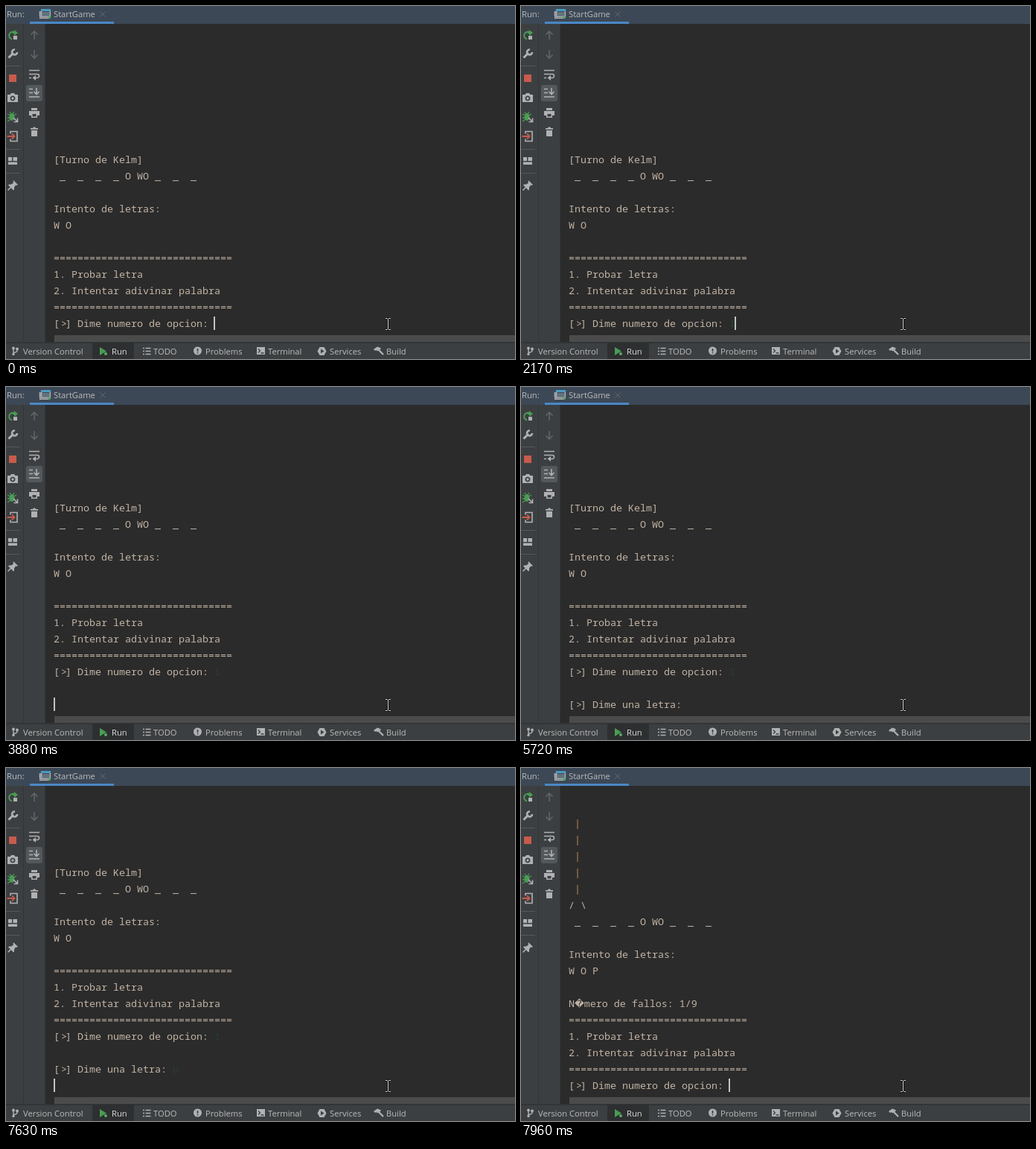
These frames come from a looping animation (684x474 px, 8000 ms). An HTML page:

```html
<!DOCTYPE html>
<html lang="es">
<head>
<meta charset="utf-8">
<title>Run console</title>
<style>
  html, body { margin: 0; width: 100%; height: 100%; overflow: hidden; background: #2b2b2b; }
  #console { position: absolute; left: 53px; top: 24px; width: 631px; height: 427px; overflow: hidden; }
  #log {
    position: absolute; left: 11px; bottom: 14px; margin: 0; color: #c2b3a4;
    font: 13.333px/22px "Noto Sans Mono", "DejaVu Sans Mono", monospace;
    font-variant-ligatures: none;
  }
  #log i { font-style: normal; position: relative; left: 2px; }
  #log b { font-weight: normal; color: #ba8c60; }
  #log u { text-decoration: none; font: 12.5px/0 "DejaVu Sans", sans-serif; }
  #log em { font-style: normal; color: #25402d; }
  #log em.fresh { color: #1f512c; }
  #caret { position: absolute; bottom: 16px; width: 2px; height: 18px; background: #c4c4c4; }
  svg { position: absolute; left: 0; top: 0; display: block; }
  text { font: 11.2px "Open Sans", "Noto Sans", sans-serif; fill: #bbb; }
  .line { fill: none; stroke: #afb1b3; stroke-width: 1.6; }
  .dim { stroke: #626568; }
  .fill { fill: #afb1b3; }
  .green { stroke: #499c54; }
  .red { stroke: #c75b4c; }
</style>
</head>
<body>
<div id="console"><pre id="log"></pre><div id="caret"></div></div>

<svg width="684" height="474" viewBox="0 0 684 474">
  <!-- panels -->
  <path fill="#3c3f41" d="M0 24H52V451H0ZM0 453H684V474H0Z"/>
  <path fill="#323537" d="M23 24h1V451h-1ZM52 24h1V451h-1ZM0 451H684v2H0Z"/>
  <path fill="#3d4856" d="M0 0H684V24H0Z"/>
  <path fill="#4a88c7" d="M32 21H145V24H32Z"/>
  <path fill="#2d2f30" d="M116 452H172V474H116Z"/>
  <path fill="#a6a6a6" fill-opacity=".26" d="M65 442H684V451H65Z"/>
  <path fill="#55585a" d="M0 80H19v1H0ZM0 192H19v1H0ZM0 224H19v1H0Z"/>

  <!-- header -->
  <text x="1" y="15">Run:</text>
  <text x="64" y="15">StartGame</text>
  <path class="line" stroke-width="1" d="M45.5 13V7M47.7 4.7H59.3V14.3H47.7Z"/>
  <path fill="#4a9bc2" d="M47 4H60V7H47Z"/>
  <path fill="#62737f" d="M49 8H58V13H49Z"/>
  <path class="fill" d="M45 7h1.5v8.5H57V17H45Z"/>
  <circle cx="58" cy="15" r="2" fill="#59a869"/>
  <path class="line dim" style="stroke-width:1" d="M126.500 7.500l7 7m0-7l-7 7"/>

  <!-- first toolbar -->
  <path class="line green" style="stroke-width:2" d="M13 36.500A5 5 0 1 0 8 44.500M9 36h5"/>
  <path fill="#499c54" d="M11 32l5 4-5 4Z"/>
  <path class="fill" d="M10 40h5v5h-5Z"/>
  <path class="line" style="stroke-width:3" d="M3.500 69.500L10 63"/>
  <path class="line" style="stroke-width:2.600" d="M12 58.500A3.500 3.500 0 1 0 15 62"/>
  <path fill="#c75b4c" d="M4 92H14V102H4Z"/>
  <path class="fill" fill-rule="evenodd" d="M2 119h3.500l1.500-2h4l1.500 2H16v10H2ZM9 120.500a3.500 3.500 0 1 0 .01 0ZM9 122.300a1.700 1.700 0 1 1-.01 0Z"/>
  <ellipse cx="8" cy="149" rx="3.500" ry="5" fill="#499c54"/>
  <path class="line green" style="stroke-width:1.300" d="M2 145l4 2m-4 3h4m-4 5l4-3M14 145l-4 2M5 142l2 3m4-3l-2 3"/>
  <path class="line" d="M10 150l5 5M15.500 150.500v5h-5"/>
  <path class="line" d="M6 171.500v-3h9v13H6v-3"/>
  <path class="line red" style="stroke-width:1.800" d="M1.500 175H11M8 171.500l3.500 3.500L8 178.500"/>
  <path class="fill" d="M3 203h5v5H3ZM9.500 203H15v5H9.500ZM3 209.500H15V213H3Z"/>
  <path class="fill" d="M10 234l6 6-2 1-1-.5-2 3v3l-1 1-7-7 1-1h3l3-2-.5-1Z"/>
  <path class="line" d="M7 243l-4.500 4.500"/>

  <!-- second toolbar -->
  <path class="line dim" d="M38 45V34M33.500 38.500L38 34l4.500 4.500M38 59V70M33.500 65.500L38 70l4.500-4.500"/>
  <rect x="27" y="106" width="22" height="22" rx="3" fill="#53585b"/>
  <path class="line" d="M31 86.500H45M31 91.500h11a2.500 2.500 0 0 1 0 5h-4M31 96.500h3"/>
  <path class="fill" d="M40 93v7l-4.500-3.500Z"/>
  <path class="line" d="M31 111.500h5M31 116.500h5M31 122H45M41 110v8M37.500 115l3.500 3.500 3.500-3.500"/>
  <path class="fill" fill-rule="evenodd" d="M34 137h8v3h-8ZM31 141H45v6h-3v3h-8v-3h-3ZM35.500 145v3.500h5V145Z"/>
  <path class="fill" d="M33 164h3l1-1.500h2l1 1.500h3v1.700H33ZM34 167h8v8h-8Z"/>

  <!-- tool window bar -->
  <path class="line" style="stroke-width:1.400" d="M10 460v8M15 461v1.500q0 2.500-5 3"/>
  <g class="fill"><circle cx="10" cy="459.500" r="1.900"/><circle cx="15" cy="460.500" r="1.900"/><circle cx="10" cy="467.500" r="1.700"/></g>
  <path fill="#499c54" d="M126 458l9 5.500-9 5.500Z"/>
  <circle cx="134" cy="467" r="2" fill="#59a869"/>
  <path class="line" d="M184 459.500h2m1.500 0h7M184 463.500h2m1.500 0h7M184 467.500h2m1.500 0h7"/>
  <circle class="fill" cx="257.500" cy="463" r="5.500"/>
  <path fill="#3c3f41" d="M256.700 460h1.700v4h-1.700ZM256.700 465h1.700v1.600h-1.700Z"/>
  <path class="fill" d="M337 458H348V468H337Z"/>
  <path class="line" style="stroke:#3c3f41;stroke-width:1.300" d="M339 460.500l2.500 2.500-2.500 2.500M342.500 466h4"/>
  <path class="fill" d="M421.500 458h6l3 5.500-3 5.500h-6l-3-5.500Z"/>
  <path fill="#3c3f41" d="M423 460.500l4.500 3-4.500 3Z"/>
  <path class="fill" d="M494 461l5-3.500 4 1.500 1 1-2 2-1-.5-2 2-1.500-1.500-1.500 1Z"/>
  <path class="line" style="stroke-width:2.300" d="M500.500 461.500l6.500 6.500"/>
  <g id="labels"></g>

  <!-- pointer -->
  <path fill="none" stroke="#171717" stroke-width="3" d="M510 419.500h2.500l1 1 1-1H517M513.500 420v14M510 434.500h2.500l1-1 1 1H517"/>
  <path fill="none" stroke="#d5d5d5" stroke-width="1" d="M510 419.500h2.500l1 1 1-1H517M513.500 420v14M510 434.500h2.500l1-1 1 1H517"/>
</svg>

<script>
const LOOP = 8000, CELL = 8;
const $ = id => document.getElementById(id);

const labels = { "Version Control": 23, Run: 142, TODO: 198, Problems: 268, Terminal: 352, Services: 435, Build: 511 };
$("labels").innerHTML = Object.entries(labels)
  .map(([name, x]) => `<text x="${x}" y="468"${name === "Run" ? ' style="fill:#ddd"' : ""}>${name}</text>`).join("");

const word = " _  _  _  _ O WO _  _  _";
const rule = "=".repeat(30);
const ask = what => `[<i>&gt;</i>] Dime ${what}: `;
const typed = (key, fresh) => `<em class="${fresh ? "fresh" : ""}">${key}</em>`;
const option = ask("numero de opcion"), letter = ask("una letra");
const menu = [rule, "1. Probar letra", "2. Intentar adivinar palabra", rule];

const turn = ["[Turno de Kelm]", word, "", "Intento de letras:", "W O", "", ...menu];
const chosen = [...turn, option + typed(1), ""];
const guessed = [...chosen, letter + typed("p")];
const nextTurn = [
  ...guessed, "", "[Turno de Mardoel]", "", "",
  ...Array(5).fill(" <b>|</b>"), "/ \\", word, "",
  "Intento de letras:", "W O P", "", "N<u>\uFFFD</u>mero de fallos: 1/9", ...menu, option
];

// start time, lines, caret column, times at which the caret toggles
const scenes = [
  [0, [...turn, option], 27, [130, 650, 1180, 1640]],
  [2170, [...turn, option + typed(1, true)], 28, [3160, 3690]],
  [3880, [...chosen, ""], 0, []],
  [4080, [...chosen, letter], 20, [4670, 5200, 5720, 6190]],
  [6250, [...chosen, letter + typed("p", true)], 21, [7240]],
  [7630, [...guessed, ""], 0, []],
  [7830, nextTurn, 27, []]
];

// remaining scroll distance after the next turn is printed
const lift = t => t < 7830 || t >= 7960 ? 0 : t < 7890 ? 109 : 17;

const log = $("log"), caret = $("caret");
let shown;
function draw(now) {
  const t = now % LOOP;
  const scene = scenes.findLast(s => s[0] <= t);
  const [, lines, column, blinks] = scene;
  if (scene !== shown) {
    log.innerHTML = lines.map(line => line + "\n").join("");
    caret.style.left = Math.max(11, 10 + CELL * column) + "px";
    shown = scene;
  }
  caret.style.opacity = blinks.filter(b => b <= t).length % 2 ? 0 : 1;
  log.style.transform = caret.style.transform = `translateY(${lift(t)}px)`;
}

const start = performance.now();
function tick() {
  draw(performance.now() - start);
  requestAnimationFrame(tick);
}
tick();
</script>
</body>
</html>
```
